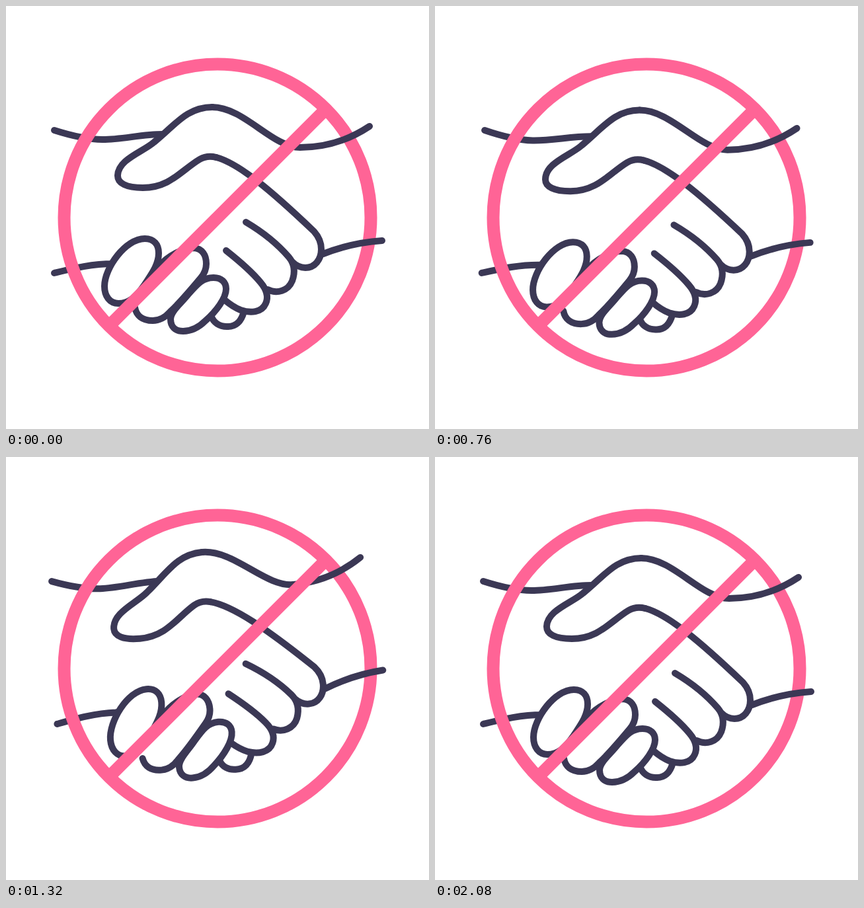
Animation, 640 px wide and 640 px high, one loop 4640 ms. Source, as an HTML page:

```html
<!DOCTYPE html>
<html lang="en">
<head>
<meta charset="utf-8">
<title>No handshakes</title>
<style>
  html, body { margin: 0; width: 100%; height: 100%; overflow: hidden; background: #fff; }
  svg { display: block; width: 100%; height: 100%; }
  .ink { fill: none; stroke: #3b3855; stroke-width: 10; stroke-linecap: round; stroke-linejoin: round; }
  .solid { fill: #fff; }
  .sign { fill: none; stroke: #ff6496; stroke-width: 19; }
</style>
</head>
<body>
<svg viewBox="0 0 640 640">
  <g id="arm" class="ink">
    <path d="M73 188C98 196 122 202 146 202C176 202 205 194 237 194L250 195"/>
    <path d="M73 404C102 397 130 390 162 390L175 389"/>
  </g>
  <circle class="sign" cx="320" cy="320" r="232"/>
  <g id="hands" class="ink">
    <!-- right arm and hand -->
    <path d="M550 182C520 202 484 214 445 214C403 214 360 153 312 153"/>
    <path d="M569 355C540 357 508 364 480 375"/>
    <path class="solid" d="M312 153C274 153 256 180 224 206C207 221 169 232 169 257C169 268 182 275 207 275C248 275 266 248 293 232C300 228 307 226 318 229"/>
    <path d="M318 229C352 238 400 278 466 341C474 350 477 358 477 368C477 384 467 396 453 396C445 396 438 392 433 387"/>
    <path d="M363 327C385 340 410 359 428 380C438 392 437 405 433 416C427 431 410 436 396 429"/>
    <path d="M333 370C352 385 371 401 385 418C396 431 397 441 393 450C387 464 370 465 355 460C345 456 338 451 330 444"/>
    <path d="M311 470C314 479 323 485 334 485C347 486 356 478 360 462"/>
    <!-- left fingers -->
    <path class="solid" d="M231 394C245 378 268 366 284 366C297 367 303 377 303 390C303 398 300 405 295 411C285 423 262 450 248 463C240 472 232 476 222 476C206 476 197 468 195 456"/>
    <path class="solid" d="M314 411C326 411 333 418 333 428C333 442 318 462 302 476C291 487 281 492 268 492C256 492 249 485 249 474C249 462 265 450 276 436C290 420 298 411 314 411Z"/>
    <path class="solid" d="M210 352C224 352 231 361 231 374C231 392 219 407 210 421C197 440 186 450 170 450C157 450 149 439 149 424C149 396 181 352 210 352Z"/>
  </g>
  <path class="sign" d="M156 484L484 156"/>
</svg>
<script>
  const LOOP = 4640, STEP = 40;
  const arm = document.getElementById('arm');
  const hands = document.getElementById('hands');

  // [time in ms, swing]; the wrist trails behind the arm
  const armKeys = [[0, 0], [500, 1.06], [920, -1.08], [1260, 0.9], [1600, -1.05], [1960, 0]];
  const wristKeys = [[100, 0], [590, 1.08], [1060, -0.9], [1360, 1.02], [1725, -0.88], [2080, 0]];

  const ease = p => (1 - Math.cos(Math.PI * p)) / 2;

  function swing(keys, t) {
    const i = keys.findIndex(k => k[0] > t);
    if (i < 1) return 0;
    const [t0, v0] = keys[i - 1], [t1, v1] = keys[i];
    return v0 + (v1 - v0) * ease((t - t0) / (t1 - t0));
  }

  function draw(time) {
    const t = Math.floor((time % LOOP) / STEP) * STEP;
    const shoulder = `rotate(${-2.92 * swing(armKeys, t)} 73 290)`;
    const wrist = `rotate(${-3.04 * swing(wristKeys, t)} 300 355)`;
    arm.setAttribute('transform', shoulder);
    hands.setAttribute('transform', `${shoulder} ${wrist}`);
  }

  const start = performance.now();
  function tick() {
    draw(performance.now() - start);
    requestAnimationFrame(tick);
  }
  tick();
</script>
</body>
</html>
```
